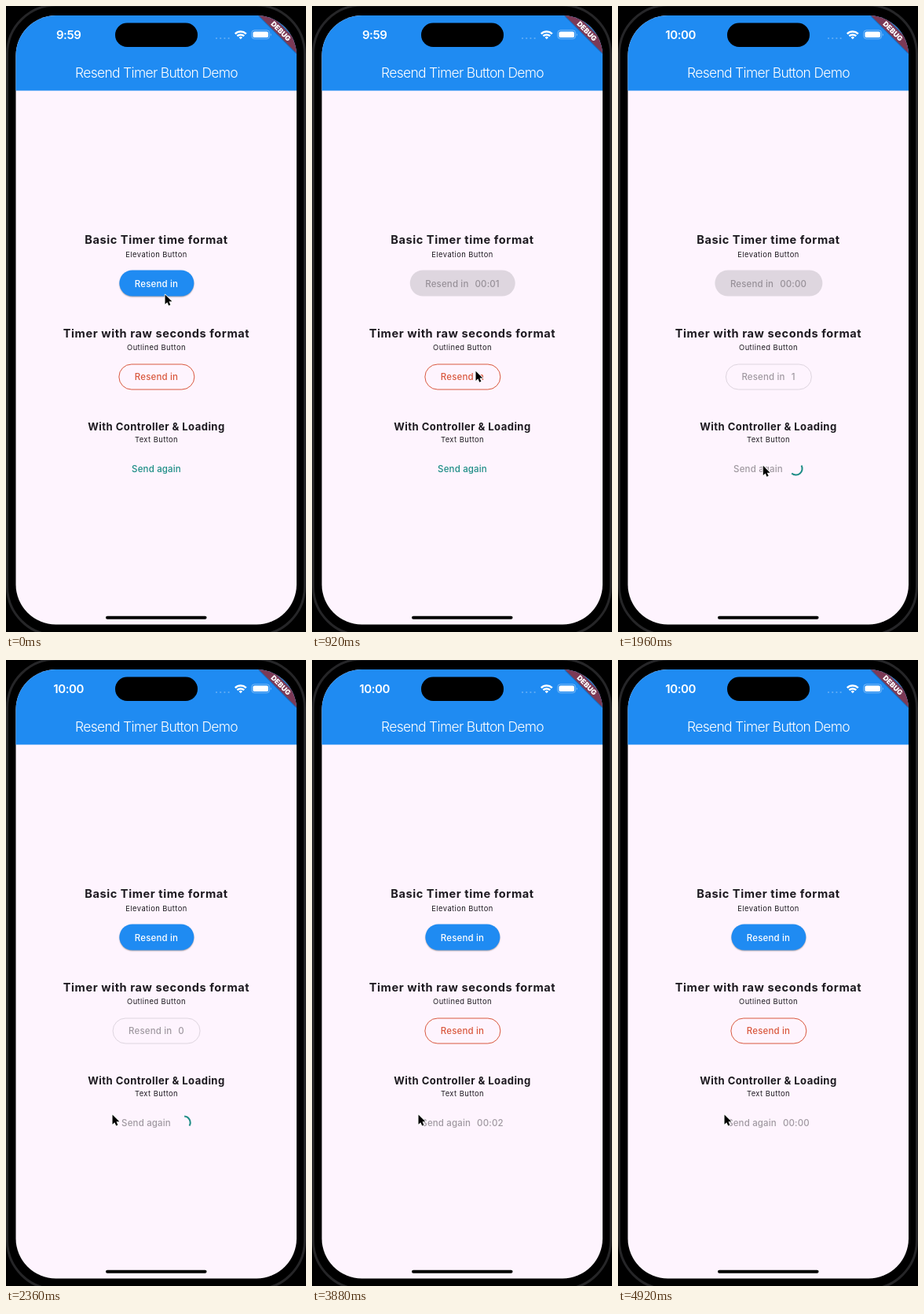
An HTML page for the animation above (5.08 s loop, 382 px wide and 795 px high).

```html
<!DOCTYPE html>
<html lang="en">
<head>
<meta charset="utf-8">
<title>Resend Timer Button Demo</title>
<style>
  html, body { margin: 0; width: 100%; height: 100%; overflow: hidden; background: #000; }
  body { position: relative; font-family: Inter, Roboto, sans-serif; color: #1d1a20; }
  svg { position: absolute; left: 0; top: 0; }
  .t, .btn { position: absolute; left: 191.5px; transform: translate(-50%, -50%); white-space: pre; }
  .t { line-height: 20px; }
  .title { top: 85px; color: #fff; font-size: 17.5px; font-weight: 300; letter-spacing: -.7px; }
  .clock { left: 79.7px; top: 37px; color: #fff; font-size: 15px; font-weight: 600; letter-spacing: -.4px; }
  .head { font-size: 14.6px; font-weight: 700; letter-spacing: .55px; }
  .small { font-size: 13.1px; letter-spacing: .43px; }
  .sub { font-size: 9.4px; letter-spacing: .42px; }

  .btn {
    --d: 0%; --off: #a099a1;
    display: flex; align-items: center; gap: 8px; box-sizing: border-box;
    height: 33px; padding: 0 20px; border-radius: 17px;
    font-size: 11.5px; font-weight: 500; letter-spacing: .15px;
    color: color-mix(in srgb, var(--on), var(--off) var(--d));
  }
  .btn [hidden] { display: none; }
  .elevated {
    --on: #fff; --off: #989199; top: 352px;
    background: color-mix(in srgb, #1f8bf2, #ded6df var(--d));
    box-shadow: 0 1px 1.5px color-mix(in srgb, rgba(0, 0, 0, .35), transparent var(--d));
  }
  .outlined {
    --on: #d9583e; top: 470.8px;
    border: 1px solid color-mix(in srgb, #d9583e, #ded5df var(--d));
  }
  .text { --on: #1d8d86; top: 587px; }
  .btn svg { position: static; display: block; }
  .btn svg[hidden] { display: none; }
</style>
</head>
<body>
<svg width="382" height="795" viewBox="0 0 382 795">
  <defs>
    <clipPath id="screen"><rect x="12.5" y="12" width="357.5" height="773.5" rx="51"/></clipPath>
  </defs>
  <rect x="1.5" y="-1" width="379" height="800" rx="62" fill="#000" stroke="#262628" stroke-width="3"/>
  <g clip-path="url(#screen)">
    <rect x="12" y="12" width="359" height="774" fill="#fef4fe"/>
    <rect x="12" y="12" width="359" height="95.5" fill="#1f8bf2"/>
    <g transform="translate(350 32) rotate(45)">
      <rect x="-50" y="-6.8" width="100" height="13.6" fill="#000" opacity=".22"/>
      <rect x="-50" y="-5.7" width="100" height="11.4" fill="#7c3a56"/>
      <text y="3.2" text-anchor="middle" font-family="Inter, Roboto, sans-serif" font-size="9" font-weight="900" fill="#fff">DEBUG</text>
    </g>
  </g>
  <rect x="139" y="21.5" width="105" height="30.5" rx="15.25"/>
  <rect x="127" y="774.8" width="128.5" height="4" rx="2"/>
  <path d="M268 41h18" stroke="#fff" stroke-opacity=".3" stroke-width="2.2" stroke-linecap="round" stroke-dasharray="0 5.2"/>
  <g fill="none" stroke="#fff" stroke-width="2.5">
    <path d="M291.8 35.3a10.2 10.2 0 0 1 14 0M294.4 38.2a6.4 6.4 0 0 1 8.8 0"/>
    <path d="M298.8 42.2l-2.2-2.3a3.2 3.2 0 0 1 4.4 0z" fill="#fff" stroke="none"/>
  </g>
  <g transform="translate(-.8 0)">
    <rect x="313.6" y="30.8" width="22.8" height="10.9" rx="3.5" fill="none" stroke="#fff" stroke-opacity=".4"/>
    <rect x="315.2" y="32.4" width="19.6" height="7.7" rx="2.2" fill="#fff"/>
    <path d="M337.7 34.4q1.8 1.9 0 3.8z" fill="#fff" opacity=".5"/>
  </g>
</svg>

<div class="t clock" id="clock">9:59</div>
<div class="t title">Resend Timer Button Demo</div>

<div class="t head" style="top:297px">Basic Timer time format</div>
<div class="t sub" style="top:315.5px">Elevation Button</div>
<div class="btn elevated" id="basic"><span>Resend in</span><span class="count" hidden></span></div>

<div class="t head" style="top:415.8px">Timer with raw seconds format</div>
<div class="t sub" style="top:434.3px">Outlined Button</div>
<div class="btn outlined" id="raw"><span>Resend in</span><span class="count" hidden></span></div>

<div class="t head small" style="top:533.5px">With Controller &amp; Loading</div>
<div class="t sub" style="top:550.5px">Text Button</div>
<div class="btn text" id="loading"><span>Send again</span><span class="count" hidden></span>
  <svg id="spinner" width="18" height="18" viewBox="-9 -9 18 18" overflow="visible" hidden><path id="arc" fill="none" stroke="#1d8d86" stroke-width="2"/></svg>
</div>

<svg id="cursor" width="14" height="19" viewBox="-2 -2 16.3 22.1">
  <path d="M0 0V14.2L3.3 11.2L5.5 16.2L8 15.1L5.8 10.3H10.3Z" stroke="#fff" stroke-width="1.8" stroke-linejoin="round" paint-order="stroke"/>
</svg>

<script>
const LOOP = 5080, TICK = 610, SPEED = 1.64, FADE = 120;
const BASIC = 240, RAW = 1020, LOAD = 1800, LOADED = 3660, MINUTE = 1900;
const $ = id => document.getElementById(id);
const clamp = x => Math.min(1, Math.max(0, x));

// Pointer stops: time, x, y
const stops = [
  [0, 202, 366], [180, 202, 360], [340, 202, 360], [840, 208, 463], [1100, 208, 464],
  [1520, 193, 557], [1700, 190, 584], [1880, 190, 584], [2280, 135, 577]
];

function pointer(t) {
  const i = stops.findIndex(s => s[0] > t);
  if (i < 0) return stops[stops.length - 1].slice(1);
  const a = stops[i - 1], b = stops[i];
  const u = (t - a[0]) / (b[0] - a[0]), e = u * u * (3 - 2 * u);
  return [a[1] + (b[1] - a[1]) * e, a[2] + (b[2] - a[2]) * e];
}

// cubic-bezier(.4, 0, .2, 1), solved by bisection
function ease(x) {
  let lo = 0, hi = 1;
  for (let i = 0; i < 20; i++) {
    const m = (lo + hi) / 2, n = 1 - m;
    if (1.2 * n * n * m + .6 * n * m * m + m * m * m < x) lo = m; else hi = m;
  }
  return lo * lo * (3 - 2 * lo);
}

// Material indeterminate progress arc
function arcPath(ms) {
  const p = ms / 1333 % 1, turn = ms / 2222 % 1;
  const head = ease(clamp(p * 2)), tail = ease(clamp(p * 2 - 1));
  const from = Math.PI * (-.5 + 1.5 * tail + 2 * turn + .5 * p);
  const sweep = Math.max(1.5 * Math.PI * (head - tail), .01);
  const at = a => `${8 * Math.cos(a)} ${8 * Math.sin(a)}`;
  return `M${at(from)}A8 8 0 ${+(sweep > Math.PI)} 1 ${at(from + sweep)}`;
}

const mmss = n => '00:0' + n;

function drawButton(id, t, off, start, format) {
  const el = $(id), count = el.querySelector('.count'), end = start + 3 * TICK;
  const d = clamp((t - off) / FADE) - clamp((t - end) / FADE);
  el.style.setProperty('--d', d * 100 + '%');
  count.hidden = t < start || t >= end;
  if (!count.hidden) count.textContent = format(2 - Math.floor((t - start) / TICK));
}

function draw(now) {
  const t = now % LOOP, [x, y] = pointer(t), busy = t >= LOAD && t < LOADED;
  $('clock').textContent = t < MINUTE ? '9:59' : '10:00';
  drawButton('basic', t, BASIC, BASIC, mmss);
  drawButton('raw', t, RAW, RAW, String);
  drawButton('loading', t, LOAD, LOADED, mmss);
  $('spinner').toggleAttribute('hidden', !busy);
  if (busy) $('arc').setAttribute('d', arcPath((t - LOAD) * SPEED));
  $('cursor').style.transform = `translate(${x - 1.2}px, ${y - 1.2}px)`;
}

let begin;
function loop(now) {
  begin ??= now;
  draw(now - begin);
  requestAnimationFrame(loop);
}
draw(0);
requestAnimationFrame(loop);
</script>
</body>
</html>
```
